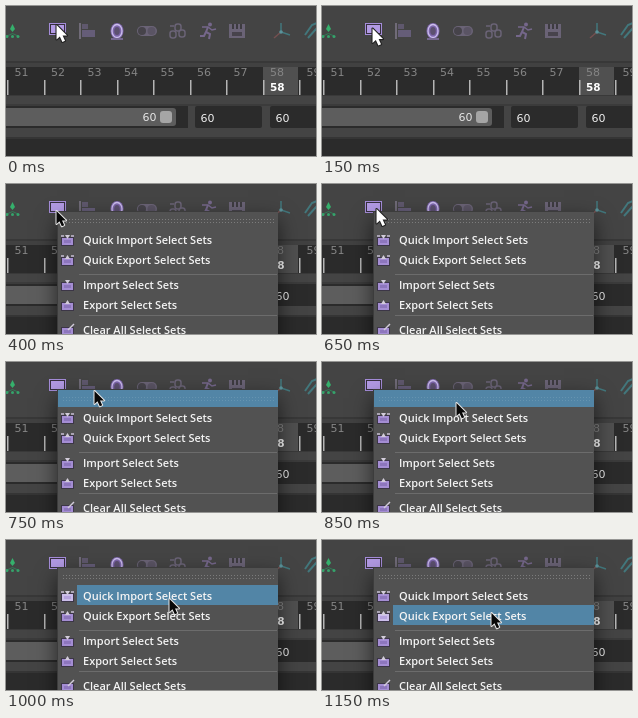
These frames come from a looping animation (310x150 px, 1.25 s). An HTML page with a canvas:

```html
<!DOCTYPE html>
<html lang="en">
<head>
<meta charset="utf-8">
<style>
html, body { margin: 0; width: 100%; height: 100%; overflow: hidden; background: #444; }
canvas { display: block; }
</style>
</head>
<body>
<canvas id="stage" width="310" height="150"></canvas>
<script>
const c = document.getElementById('stage').getContext('2d');
const LOOP = 1250, STEP = 50, MENU_AT = 400;
const UI = '"DejaVu Sans", sans-serif', MENU = '"Open Sans", sans-serif';
const DIM = '#6a6376';

// time, x, y of the pointer tip
const path = [
  [0, 50, 18], [300, 50, 25], [399, 50, 25], [400, 50, 26], [649, 50, 26],
  [650, 54, 24], [700, 66, 25], [750, 88, 28], [800, 113, 34], [850, 134, 40],
  [900, 147, 47], [1000, 163, 58], [1150, 169, 72], [LOOP, 169, 72]
];

const items = [
  ['Quick Import Select Sets', 56], ['Quick Export Select Sets', 76],
  ['Import Select Sets', 101], ['Export Select Sets', 121],
  ['Clear All Select Sets', 146]
];

function rect(x, y, w, h, color) {
  c.fillStyle = color;
  c.fillRect(x, y, w, h);
}

function round(x, y, w, h, r, color) {
  c.fillStyle = color;
  c.beginPath();
  c.roundRect(x, y, w, h, r);
  c.fill();
}

function poly(points, color) {
  c.beginPath();
  points.forEach(([x, y]) => c.lineTo(x, y));
  c.closePath();
  c.fillStyle = color;
  c.fill();
}

function line(points, color, width = 1.5) {
  c.beginPath();
  points.forEach(([x, y]) => c.lineTo(x, y));
  c.strokeStyle = color;
  c.lineWidth = width;
  c.stroke();
}

function oval(x, y, rx, ry, color, width) {
  c.beginPath();
  c.ellipse(x, y, rx, ry, 0, 0, 7);
  c.fillStyle = c.strokeStyle = color;
  c.lineWidth = width || 1;
  width ? c.stroke() : c.fill();
}

function text(s, x, y, color, font = '11px ' + UI) {
  c.font = font;
  c.fillStyle = color;
  c.fillText(s, x, y);
}

function selectIcon(hot) {
  rect(43, 17, 17, 12, hot ? '#c4b4ec' : '#a48cd8');
  rect(44, 18, 15, 10, '#37303f');
  rect(45, 19, 13, 8, hot ? '#cfc2f0' : '#b29ae4');
}

function shelf() {
  // green drop with a dotted base
  poly([[6.5, 18], [9, 23], [6.5, 26], [4, 23]], '#35b06c');
  line([[1, 30], [6.5, 27.5], [12, 30]], '#2f7d56', 1);
  [1, 6.5, 12].forEach(x => oval(x, 30.5, 1.5, 1.5, '#35a36b'));

  // flag
  rect(73, 17, 2, 16, '#706b78');
  rect(76, 18, 6, 5, '#5f586d');
  rect(76, 24, 13, 7, '#655d78');

  // ring
  oval(111, 25, 6.5, 8, '#7d66ab');
  oval(111, 25, 5, 6.5, '#cbbdec', 1.3);
  oval(111, 25, 2.8, 4, '#5c5070');
  rect(105, 32, 12, 2, '#75678f');

  // toggle
  round(131, 20, 20, 10, 5, DIM);
  oval(136, 25, 4, 4, '#46434a');
  oval(145.5, 25, 4, 4, '#5a5464');

  // chain
  c.strokeStyle = DIM;
  c.lineWidth = 1.5;
  [[169, 18], [164, 25], [173, 24]].forEach(([x, y]) => {
    c.beginPath();
    c.roundRect(x, y, 6, 7, 2.5);
    c.stroke();
  });
  line([[164, 20], [168, 20]], DIM);

  // runner
  oval(204, 18.5, 2, 2, '#75678b');
  line([[196, 21], [202, 21], [206, 24], [210, 23]], '#75678b');
  line([[202, 21], [200, 26], [204, 28], [203, 33]], '#75678b', 2);
  line([[200, 26], [198, 30], [194, 30]], '#75678b', 2);

  // box
  rect(223, 18, 16, 14, DIM);
  [226, 230, 234].forEach(x => rect(x, 18, 2, 5, '#3d3b40'));
  rect(226, 26, 10, 4, '#47434c');

  // axes
  line([[275, 17], [275, 26], [284, 29]], '#42777c', 1.5);
  line([[275, 26], [268, 32]], '#755050', 1.5);
  oval(275, 26, 1.8, 1.8, '#5b9299');
  line([[299, 29], [306, 19], [311, 17]], '#42777c', 2);
  line([[302, 32], [311, 22]], '#42777c', 2);
}

function timeline() {
  rect(0, 55, 310, 2, '#383838');
  rect(0, 57, 310, 4, '#414141');
  rect(0, 61, 310, 28, '#2b2b2b');
  rect(257, 61, 35, 28, '#505050');
  for (let i = 0; i < 9; i++) {
    const x = 1 + i * 36.5;
    rect(Math.round(x), 74, 1.5, 15, '#b5b5b5');
    text(51 + i, x + 7.5, 70, '#858585');
  }
  text('58', 264, 85, '#fff', 'bold 10.5px ' + UI);
  rect(0, 89, 310, 1, '#393939');
}

function rangeBar() {
  rect(0, 98, 310, 2, '#3b3b3b');
  rect(0, 100, 182, 22, '#2b2b2b');
  round(-5, 102, 175, 18, 3, '#5d5d5d');
  text('60', 136.5, 115, '#e5e5e5');
  round(154, 105, 12, 12, 3, '#a5a5a5');
  [[189, 67], [264, 50]].forEach(([x, w]) => {
    round(x, 100, w, 22, 2, '#2b2b2b');
    text('60', x + 5.5, 115.5, '#eee');
  });
  rect(0, 131, 310, 2, '#353535');
  rect(0, 133, 310, 17, '#2b2b2b');
}

function itemIcon(y, i, active) {
  rect(55, y - 3, 13, 9, '#3c3647');
  rect(56, y - 2, 11, 7, active ? '#cbbdea' : '#a48dd3');
  rect(58, y, 7, 3, active ? '#b5a2dd' : '#8d76bd');
  const light = '#d2ccda', dir = i % 2 ? -1 : 1, mid = y - 3;
  if (i < 4) poly([[59, mid - 2 * dir], [64, mid - 2 * dir], [61.5, mid + 2 * dir]], light);
  else line([[62, y], [68, y - 6]], light);
  if (i < 2) [55, 65].forEach(x => rect(x, y - 5, 3, 2, '#aaa4b3'));
}

function menu(tip) {
  c.save();
  c.shadowColor = 'rgba(0,0,0,.6)';
  c.shadowBlur = 20;
  c.shadowOffsetY = 9;
  rect(51, 27, 221, 150, '#525252');
  c.restore();
  rect(51, 27, 221, 1, '#3c3c3c');
  rect(51, 27, 1, 123, '#3c3c3c');

  const y = tip[1], onTear = y >= 28 && y < 45;
  const active = y < 45 ? -1 : y < 65 ? 0 : 1;
  if (onTear) rect(52, 28, 220, 17, '#5285a6');
  if (active >= 0) rect(71, 45 + active * 20, 201, 20, '#5285a6');

  const dots = onTear ? '#6694b0' : '#7c7c7c';
  for (let x = 57; x < 268; x += 3) {
    rect(x, 35, 1, 1, dots);
    rect(x, 38, 1, 1, dots);
  }
  [90, 131].forEach(y => rect(73, y, 198, 1, '#6c6c6c'));

  items.forEach(([label, y], i) => {
    itemIcon(y, i, i === active);
    text(label, 77, y + 4, '#f4f4f4', '600 11px ' + MENU);
  });
}

function pointer([x, y], dark) {
  const arrow = [[.5, 1], [.5, 14], [3.5, 11.3], [5.8, 16.3], [8.2, 15.2], [6, 10.5], [10, 10.5]];
  const fill = dark ? '#080808' : '#fff';
  c.save();
  c.translate(x, y);
  if (!dark) c.scale(1.1, 1.1);
  c.lineJoin = 'round';
  c.lineWidth = 2;
  c.strokeStyle = dark ? '#e8e8e8' : '#222';
  poly(arrow, fill);
  c.stroke();
  poly(arrow, fill);
  c.restore();
}

function tipAt(t) {
  const i = path.findIndex(p => p[0] > t);
  const [t0, x0, y0] = path[i - 1], [t1, x1, y1] = path[i];
  const k = (t - t0) / (t1 - t0);
  return [x0 + (x1 - x0) * k, y0 + (y1 - y0) * k];
}

function draw(now) {
  const t = Math.floor(now % LOOP / STEP) * STEP;
  const tip = tipAt(t), open = t >= MENU_AT;
  const hover = t >= 200 && !open;
  const dark = t >= 300 && t < 650 || t >= 750;
  rect(0, 0, 310, 150, '#444');
  shelf();
  selectIcon(hover);
  if (hover) poly([[39, 13], [45, 8], [51, 13]], '#222');
  timeline();
  rangeBar();
  if (open) menu(tip);
  pointer(tip, dark);
  requestAnimationFrame(draw);
}
requestAnimationFrame(draw);
</script>
</body>
</html>
```
